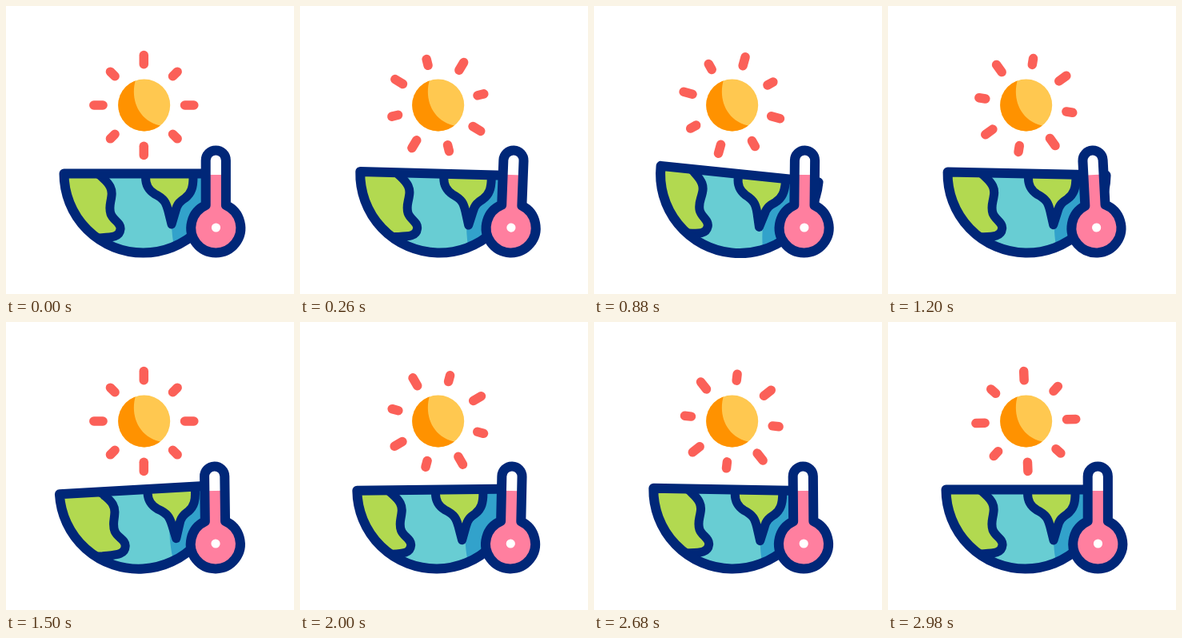
An HTML page for the animation above (3000 ms loop, 360 by 360 pixels).

```html
<!DOCTYPE html>
<html lang="en">
<head>
<meta charset="utf-8">
<title>Warming planet</title>
<style>
  html, body { margin: 0; width: 100%; height: 100%; overflow: hidden; background: #fff; }
  svg { display: block; width: 100vw; height: 100vh; }
  .line { stroke: #002778; stroke-width: 12; stroke-linecap: round; stroke-linejoin: round; }
  #land { stroke-width: 11; }
</style>
</head>
<body>
<svg viewBox="0 0 360 360">
  <defs>
    <path id="bowl" d="M72.5 209.5H270.5A99 99 0 0 1 72.5 209.5Z"/>
    <clipPath id="inBowl"><use href="#bowl"/></clipPath>
    <clipPath id="inSun"><circle cx="172.7" cy="124" r="32.5"/></clipPath>
    <path id="tube" d="M249.7 193A12.6 12.6 0 0 1 274.900 193V249.1A31 31 0 1 1 249.7 249.1Z"/>
    <clipPath id="inTube"><use href="#tube"/></clipPath>
  </defs>

  <g clip-path="url(#inSun)">
    <rect x="140" y="91" width="66" height="66" fill="#ffc850"/>
    <path d="M163.500 88C153.500 113 164 145 196 150V160H135V88Z" fill="#ff9200"/>
  </g>
  <g id="rays" stroke="#fb6058" stroke-width="11.500" stroke-linecap="round"></g>

  <g id="earth">
    <use href="#bowl" fill="#68cdd3"/>
    <g clip-path="url(#inBowl)">
      <path d="M234 205C232 228 207 240 207 268C207 285 209 298 213 312H290V205Z" fill="#32a2cb"/>
      <g id="land" class="line" fill="#b2d950">
        <path d="M40 205H102Q114 207 121 215C130 223 133 229 132 237C131 247 128 251 131 260C134 268 144 271 143 279C142 290 130 289 114 290H40Z"/>
        <path d="M174.500 205V214C174.500 224 178 230 186 235C198 241 200 246 202.500 255L207 273L212 256C214 247 218 244 224 240C232 234 234 226 234 214V205Z"/>
      </g>
    </g>
    <use href="#bowl" class="line" fill="none"/>
  </g>

  <g id="thermo">
    <use href="#tube" fill="#fff"/>
    <rect x="225" y="211" width="75" height="105" fill="#ff7f9f" clip-path="url(#inTube)"/>
    <circle cx="262.500" cy="277" r="5.600" fill="#fff"/>
    <use href="#tube" class="line" fill="none"/>
  </g>
</svg>
<script>
const LOOP = 3000, STEP = 20;
const byId = id => document.getElementById(id);
const rays = byId('rays'), earth = byId('earth'), land = byId('land'), thermo = byId('thermo');

// Each key is [time in ms, value]; motion eases in and out between keys.
const earthTilt = [[0, 0], [800, 6.2], [1580, -3.5], [2390, 1.9], [3000, 0]];
const thermoTilt = [[0, 0], [540, 4.7], [1190, -3], [1840, 1.8], [2400, -0.9], [3000, 0]];
const landShift = [[0, 0], [500, 5], [1000, -6], [1500, 8], [2000, -4], [2500, 0], [3000, 0]];

function valueAt(keys, t) {
  const i = keys.findIndex(key => key[0] > t);
  const [t0, a] = keys[i - 1], [t1, b] = keys[i];
  const p = (t - t0) / (t1 - t0);
  return a + (b - a) * p * p * (3 - 2 * p);
}

for (let i = 0; i < 8; i++) {
  const ray = document.createElementNS('http://www.w3.org/2000/svg', 'path');
  ray.setAttribute('d', i % 2 ? 'M172.3 72.8V64.8' : 'M172.3 72.8V61.5');
  ray.setAttribute('transform', `rotate(${i * 45} 172.3 124)`);
  rays.append(ray);
}

function draw(t) {
  rays.setAttribute('transform', `rotate(${t / LOOP * 360} 172.3 124)`);
  earth.setAttribute('transform', `rotate(${valueAt(earthTilt, t)} 171.5 312)`);
  land.setAttribute('transform', `translate(${valueAt(landShift, t)} 0)`);
  thermo.setAttribute('transform', `rotate(${valueAt(thermoTilt, t)} 262 313)`);
}

const start = performance.now();
function tick() {
  const t = (performance.now() - start) % LOOP;
  draw(Math.floor(t / STEP) * STEP);
  requestAnimationFrame(tick);
}
tick();
</script>
</body>
</html>
```
